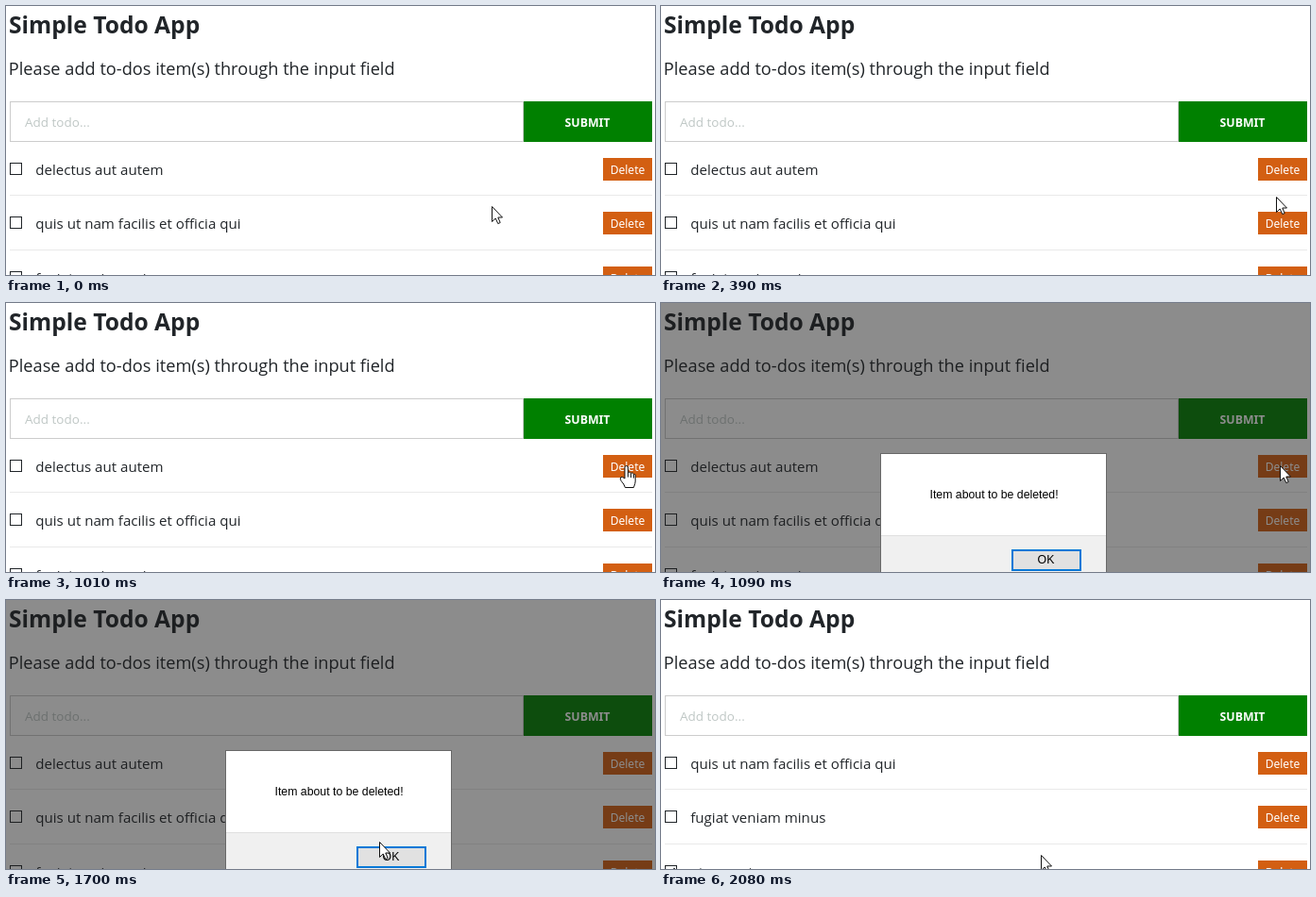
An HTML page for the animation above (2310 ms loop, 687 by 285 pixels).

```html
<!DOCTYPE html>
<html lang="en">
<head>
<meta charset="utf-8">
<title>Todo list</title>
<style>
  html, body { margin: 0; width: 100%; height: 100%; overflow: hidden; background: #fff; }
  svg {
    display: block; width: 687px; height: 285px;
    font-family: "Open Sans", "Noto Sans", sans-serif;
    font-variant-ligatures: none;
  }
  .ink { fill: #212529; }
  .title { font-size: 24.6px; font-weight: 700; }
  .lead { font-size: 18.2px; }
  .item { font-size: 15.1px; }
  .hint { font-size: 13.5px; fill: #bfc7c5; }
  .field { fill: #fff; stroke: #ccc; }
  .line { fill: #e9e9e9; }
  .go { fill: #008000; }
  .go-ink { fill: #fff; font: 700 12.3px "Noto Sans", sans-serif; }
  .del { fill: #d35f12; }
  .del-ink { fill: #fff; font: 12px "Noto Sans", sans-serif; }
  .box { fill: #fff; stroke: #212529; }
  .tick { fill: none; stroke: #212529; stroke-width: 1.5; }
  .dialog text { font: 12.3px "Liberation Sans", Arial, sans-serif; fill: #000; }
  .cursor { fill: #fff; stroke: #111; stroke-width: 1; stroke-linejoin: round; }
</style>
</head>
<body>
<svg viewBox="0 0 687 285">
  <rect width="687" height="285" fill="#fff"/>
  <text class="ink title" x="3" y="28.5">Simple Todo App</text>
  <text class="ink lead" x="2.8" y="73">Please add to-dos item(s) through the input field</text>
  <rect class="field" x="4.5" y="101.5" width="543" height="42"/>
  <text class="hint" x="20" y="128">Add todo...</text>
  <rect class="go" x="548" y="101" width="136" height="43"/>
  <text class="go-ink" x="615.5" y="128" text-anchor="middle">SUBMIT</text>
  <g id="rows"></g>
  <g id="dialog" class="dialog">
    <rect width="687" height="285" fill="#1a1a1a" opacity=".5"/>
    <rect x="232.5" y="159.5" width="239" height="140" fill="#fff" stroke="#686868"/>
    <rect x="233" y="246" width="238" height="39" fill="#f0f0f0"/>
    <rect x="233" y="246" width="238" height="1" fill="#dfdfdf"/>
    <text x="284.5" y="207">Item about to be deleted!</text>
    <rect id="ok"/>
    <text x="407.5" y="276" text-anchor="middle">OK</text>
  </g>
  <circle id="click" r="12.3" fill="#fafa00" opacity=".62"/>
  <g id="cursor" class="cursor">
    <path id="arrow" d="M.5 .5V16.5L4.2 13 6.8 18.6 9.2 17.5 6.8 12H11.5Z"/>
    <path id="hand" d="M-2 14V2Q-2 .5-.3 .5T1.4 2V8Q2 6.7 3.3 7.2 4.6 7.6 4.6 8.8 5.2 7.6 6.5 8.2 7.4 8.7 7.4 9.8 8.4 9 9.2 9.8V17Q9.2 19 7.4 23.5H-1.6Q-2.6 20-5.8 16.5-7.6 13.8-6.2 12.6-4.6 11.6-2 14ZM1.4 8V12.5M4.6 9V13M7.4 10V13.5"/>
  </g>
</svg>
<script>
const LOOP = 2310;
const OPEN = 1090, CLOSE = 2080;
const ROW_Y = [0, 57, 115];
const TODOS = [
  { text: 'delectus aut autem' },
  { text: 'quis ut nam facilis et officia qui' },
  { text: 'fugiat veniam minus' },
  { text: 'et porro tempora', done: true }
];
// Pointer stops: start time, x, y
const STOPS = [
  [0, 514, 212], [80, 530, 203], [160, 568, 190], [230, 608, 184], [310, 640, 192],
  [390, 651, 202], [560, 652, 196], [640, 654, 186], [710, 656, 177], [790, 657, 172],
  [1090, 655, 172], [1240, 602, 177], [1320, 508, 186], [1400, 427, 197], [1470, 399, 212],
  [1550, 388, 229], [1630, 390, 245], [1700, 395, 256], [1770, 398, 263],
  [1850, 401, 268], [1920, 402, 270]
];

const $ = id => document.getElementById(id);
const within = (t, from, to) => t >= from && t < to;
const show = (el, on) => el.setAttribute('visibility', on ? 'visible' : 'hidden');
const attrs = (el, values) => {
  for (const key in values) el.setAttribute(key, values[key]);
};

function row({ text, done }, i) {
  return `<g transform="translate(0 ${ROW_Y[i]})">
    <rect class="box" x="4.5" y="166.5" width="12" height="12"/>
    ${done ? '<path class="tick" d="M6.5 172.5L9.5 175.5 14.5 169"/>' : ''}
    <text class="ink item" x="31.2" y="179">${text}</text>
    <rect class="del" x="632" y="161" width="52" height="24"/>
    <text class="del-ink" x="658" y="178" text-anchor="middle">Delete</text>
    <rect class="line" x="4" y="${i ? 201 : 200}" width="680" height="1"/>
  </g>`;
}

let first = -1;
function listFrom(start) {
  if (start === first) return;
  first = start;
  $('rows').innerHTML = TODOS.slice(start, start + 3).map(row).join('');
}

// The OK button: focused, hovered, pressed
function paintOk(t) {
  const pressed = t >= 2000, hover = t >= 1770;
  const w = pressed ? 1 : 2;
  attrs($('ok'), {
    x: 371 + w / 2, y: 261 + w / 2, width: 74 - w, height: 23 - w,
    fill: pressed ? '#cce4f7' : hover ? '#e5f1fb' : '#e1e1e1',
    stroke: pressed ? '#005499' : '#0078d7',
    'stroke-width': w
  });
}

function draw(t) {
  listFrom(t < CLOSE ? 0 : 1);
  show($('dialog'), within(t, OPEN, CLOSE));
  paintOk(t);

  const [, x, y] = STOPS.filter(stop => stop[0] <= t).pop();
  const pointing = within(t, 710, OPEN);
  $('cursor').setAttribute('transform', `translate(${x} ${y})`);
  show($('arrow'), !pointing);
  show($('hand'), pointing);

  attrs($('click'), { cx: x - 1, cy: y + 0.5 });
  show($('click'), within(t, 860, 1010) || within(t, 2000, CLOSE));
}

const start = performance.now();
function tick() {
  draw((performance.now() - start) % LOOP);
  requestAnimationFrame(tick);
}
tick();
</script>
</body>
</html>
```
